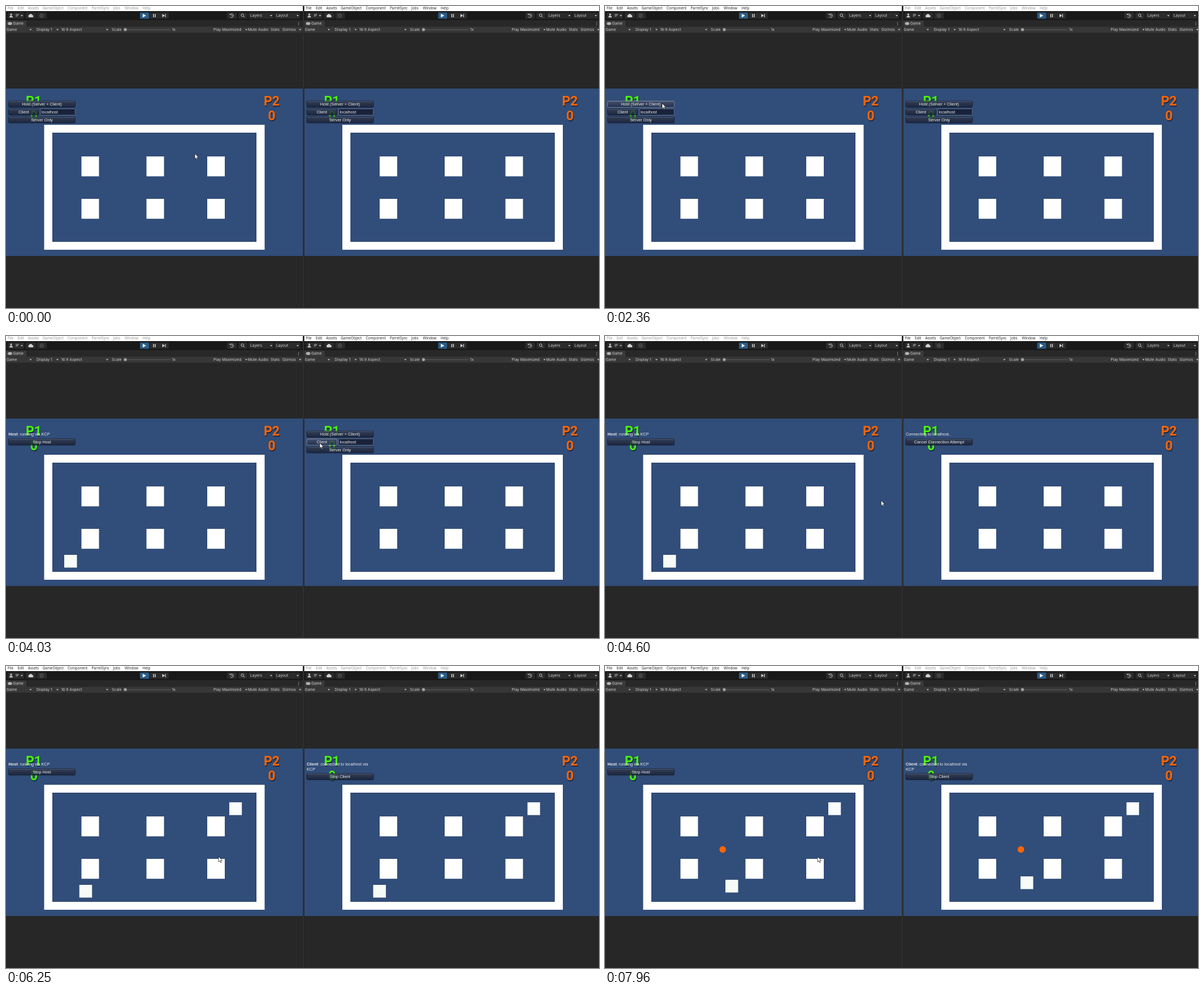
Animation, 1049 px wide and 534 px high, one loop 8000 ms. Source, as an HTML page:

```html
<!DOCTYPE html>
<html lang="en">
<head>
<meta charset="utf-8">
<title>Two game views</title>
<style>
html, body { margin: 0; width: 100%; height: 100%; overflow: hidden; background: #272727; }
svg { display: block; width: 1049px; height: 534px; }
text { white-space: pre; }
.menu { font: 6.4px "Open Sans", sans-serif; fill: #929292; }
.menu.on { fill: #1c1c1c; }
.ui { font: 6.7px Inter, sans-serif; fill: #cfcfcf; }
.gui { font: 7.3px "Liberation Sans", Arial, sans-serif; fill: #ececec; }
.mid { text-anchor: middle; }
.score { font: bold 23px Roboto, sans-serif; text-anchor: middle; }
.btn rect { fill: url(#face); stroke: #141d31; stroke-width: .8; }
.btn path { stroke: #7a8296; stroke-width: .7; opacity: .65; }
.btn.hover rect { fill: url(#lit); stroke: #8790a4; }
</style>
</head>
<body>
<svg id="stage" viewBox="0 0 1049 534" xmlns="http://www.w3.org/2000/svg"></svg>
<script>
const LOOP = 8000, SHIFT = 527.5;
const HOSTED = 2430, CONNECTING = 4160, CONNECTED = 4620, BALL = 6450;

// Motion tables: [time, x, y]
const mouse = [
  [420, 334, 261], [800, 228, 236], [1190, 121, 202], [1850, 101, 172],
  [2400, 101, 172], [2750, 235, 212], [3170, 462, 225], [3400, 522, 212],
  [3630, 555, 189], [4220, 555, 189], [4570, 500, 286], [4900, 376, 337]
];
const localPlayer = [
  [5845, 103, 387], [6650, 156, 387], [7010, 182, 362], [7080, 182, 357],
  [7500, 182, 357], [7660, 193, 357], [7960, 213, 378]
];
const remotePlayer = [
  [5960, 103, 387], [6770, 156, 387], [7140, 182, 361.5], [7220, 182, 357],
  [7580, 182, 357], [7745, 193, 357], [7960, 207.5, 372]
];
// Which window has the focus from each time on
const focus = [[0, 1], [1240, 0], [3780, 1], [5120, 0]];

const rect = (x, y, w, h, fill, more = "") =>
  `<rect x="${x}" y="${y}" width="${w}" height="${h}" fill="${fill}" ${more}/>`;
const text = (cls, x, y, s, more = "") => `<text class="${cls}" x="${x}" y="${y}" ${more}>${s}</text>`;
const arrow = (x, y) => `<path d="M${x - 2} ${y - 1}h4l-2 2.4z" fill="#c4c4c4"/>`;
const line = (d, w = 1, color = "#c4c4c4") => `<path d="${d}" fill="none" stroke="${color}" stroke-width="${w}"/>`;

function button(x, y, w, label) {
  return `<g class="btn" data-box="${x},${y},${w},11.5">` +
    `<rect x="${x}" y="${y}" width="${w}" height="11.2" rx="1.8"/>` +
    `<path d="M${x + 1.5} ${y + .9}h${w - 3}"/>` +
    text("gui mid", x + w / 2, y + 8.3, label) + `</g>`;
}

function score(x, y, s, color) {
  return text("score", x + 1, y + 1.2, s, 'fill="#1b2b48"') + text("score", x, y, s, `fill="${color}"`);
}

function menuBar(id) {
  const items = [["File", 3], ["Edit", 20.5], ["Assets", 39], ["GameObject", 64.7], ["Component", 109],
    ["ParrelSync", 151.5], ["Jobs", 189.5], ["Window", 210], ["Help", 241.5]];
  return rect(0, 0, 525, 9, "#fff") + `<g class="menu" id="menu${id}">` +
    items.map(([s, x]) => `<text x="${x}" y="5.6">${s}</text>`).join("") + `</g>`;
}

function toolbar() {
  const cells = [[3, 29], [35, 18], [55, 17], [237, 16], [254, 17], [271, 17], [391, 17], [411, 16], [429, 44], [475, 45]];
  return rect(0, 9, 525, 16, "#191919") +
    cells.map(([x, w]) => rect(x, 11.5, w, 11, x === 237 ? "#2c5d87" : "#2b2b2b", 'rx="1.2"')).join("") +
    `<circle cx="9" cy="15" r="1.7" fill="#c4c4c4"/><path d="M6 20.3c0-4.4 6-4.4 6 0z" fill="#c4c4c4"/>` +
    text("ui", 17, 19.4, "IP") + arrow(28, 17) +
    `<path d="M41 20a2.2 2.2 0 0 1 0-4.2a3 3 0 0 1 5.6.3a2 2 0 0 1 .4 3.9z" fill="#d0d0d0"/>` +
    `<circle cx="63" cy="17" r="3" fill="none" stroke="#686868"/><circle cx="63" cy="17" r="1" fill="#686868"/>` +
    `<path d="M241.8 13.8l6 3.2l-6 3.2z" fill="#fff"/>` +
    line("M261 14v6M264 14v6", 1.5, "#d4d4d4") +
    `<path d="M276.5 14l4.5 3l-4.5 3z" fill="#d4d4d4"/>` + line("M282 14v6", 1.2, "#d4d4d4") +
    line("M396.5 15a3.3 3.3 0 1 1 .1 4.2M396 13.5v2h2M399.5 15v2.2h1.8", .9) +
    `<circle cx="418.2" cy="16.2" r="2.3" fill="none" stroke="#c4c4c4"/>` + line("M420 18l2.2 2.2") +
    text("ui", 432, 19.4, "Layers") + arrow(469, 17) +
    text("ui", 478, 19.4, "Layout") + arrow(516, 17);
}

function gameBar() {
  const labels = [["Game", 1], ["Display 1", 54], ["16:9 Aspect", 97.5], ["Scale", 187], ["1x", 293.5],
    ["Play Maximized", 367], ["Mute Audio", 428], ["Stats", 468], ["Gizmos", 489]];
  return rect(0, 25, 525, 11.5, "#282828") + rect(0, 26, 36, 10.5, "#3a3a3a") +
    rect(3.2, 28.8, 7.6, 4.4, "#d0d0d0", 'rx="2.2"') +
    `<circle cx="5.3" cy="31" r=".8" fill="#333"/><circle cx="8.7" cy="31" r=".8" fill="#333"/>` +
    text("ui", 12.5, 33.4, "Game") +
    [28.5, 30.8, 33.1].map(y => rect(517, y, 1.1, 1.1, "#c4c4c4")).join("") +
    rect(0, 36.5, 525, 10.7, "#373737") +
    labels.map(([s, x]) => text("ui", x, 44.3, s)).join("") +
    [43.5, 91, 179, 425, 520.3].map(x => arrow(x, 41.8)).join("") +
    rect(211, 41.4, 80, 1, "#606060") + `<circle cx="211" cy="41.8" r="2.7" fill="#a0a0a0"/>`;
}

function arena() {
  const blocks = [133.5, 248.5, 356].map(x => [266, 341].map(y => rect(x, y, 31, 35.2, "#fff")).join("")).join("");
  return rect(0, 146, 525, 296, "#314d79") +
    rect(67.5, 210, 390, 221, "#fff") +
    rect(82, 224, 361, 192.8, "#314d79") +
    rect(82.4, 224.4, 360.2, 192, "none", 'stroke="#223a66" stroke-width=".8"') + blocks;
}

function panel(id) {
  const startMenu = button(4.5, 168, 118, "Host (Server + Client)") +
    button(4.5, 181.8, 53.5, "Client") +
    rect(61, 181.8, 61.3, 11.2, "#18223b", 'rx="1.5" stroke="#717c93" stroke-width=".8"') +
    text("gui", 63, 190, "localhost") +
    button(4.5, 195.6, 118, "Server Only");
  const bold = s => `<tspan font-weight="bold">${s}</tspan>`;
  const running = id
    ? text("gui", 4.5, 176, bold("Client") + ": connected to localhost via") + text("gui", 4.5, 184.5, "KCP") +
      button(4.5, 190, 118, "Stop Client")
    : text("gui", 4.5, 176, bold("Host") + ": running via KCP") + button(4.5, 181.8, 118, "Stop Host");
  const waiting = text("gui", 4.5, 176, "Connecting to localhost..") + button(4.5, 181.8, 118, "Cancel Connection Attempt");
  return `<g transform="translate(${id * SHIFT})">` +
    rect(0, 0, 525, 534, "#272727") + menuBar(id) + toolbar() + gameBar() + arena() +
    `<circle id="ball${id}" cx="208.2" cy="324.4" r="5.8" fill="#ff6505"/>` +
    rect(0, 0, 22.5, 22.5, "#f6fbf8", `id="one${id}"`) +
    rect(395, 241, 22.2, 22.6, "#fafdfd", `id="two${id}"`) +
    score(49, 176.3, "P1", "#48f60a") + score(49.3, 202.3, "0", "#48f60a") +
    score(470, 176.3, "P2", "#ff6505") + score(470, 202.3, "0", "#ff6505") +
    `<g id="start${id}">${startMenu}</g><g id="wait${id}">${waiting}</g><g id="run${id}">${running}</g></g>`;
}

const gradient = (id, top, bottom) =>
  `<linearGradient id="${id}" x2="0" y2="1"><stop stop-color="${top}" stop-opacity=".84"/>` +
  `<stop offset="1" stop-color="${bottom}" stop-opacity=".84"/></linearGradient>`;

const stage = document.getElementById("stage");
stage.innerHTML = `<defs>${gradient("face", "#343c50", "#171f33")}${gradient("lit", "#47506a", "#202a43")}</defs>` +
  panel(0) + panel(1) + rect(525, 0, 2.5, 534, "#202020") + rect(525.6, 9, .9, 525, "#454545") +
  `<path id="mouse" d="M0 0V9.4L2.1 7.5L3.6 10.8L5.1 10.1L3.7 6.9H6.6Z" fill="#fff" stroke="#151515" stroke-width=".7"/>`;

const el = id => document.getElementById(id);
const show = (id, on) => el(id).setAttribute("visibility", on ? "visible" : "hidden");
const move = (id, [x, y]) => el(id).setAttribute("transform", `translate(${x} ${y})`);

function along(table, t) {
  const i = table.findIndex(p => p[0] > t);
  if (i === 0) return table[0].slice(1);
  if (i < 0) return table[table.length - 1].slice(1);
  const [t0, x0, y0] = table[i - 1], [t1, x1, y1] = table[i];
  const k = (t - t0) / (t1 - t0);
  return [x0 + (x1 - x0) * k, y0 + (y1 - y0) * k];
}

const buttons = [...document.querySelectorAll(".btn")].map(node => ({
  node,
  box: node.dataset.box.split(",").map(Number),
  shift: node.closest("#start1, #wait1, #run1") ? SHIFT : 0
}));

function draw(t) {
  const active = focus.filter(f => f[0] <= t).pop()[1];
  const pos = along(mouse, t);
  const starts = [HOSTED, CONNECTING], runs = [HOSTED, CONNECTED];
  for (const id of [0, 1]) {
    el("menu" + id).classList.toggle("on", id === active);
    show("start" + id, t < starts[id]);
    show("wait" + id, t >= starts[id] && t < runs[id]);
    show("run" + id, t >= runs[id]);
    show("one" + id, t >= runs[id]);
    show("two" + id, t >= CONNECTED);
    show("ball" + id, t >= BALL);
  }
  move("one0", along(localPlayer, t));
  move("one1", along(remotePlayer, t));
  move("mouse", pos);
  for (const { node, box: [x, y, w, h], shift } of buttons) {
    const dx = pos[0] - shift - x, dy = pos[1] - y;
    node.classList.toggle("hover", t >= 1240 && dx >= 0 && dx <= w && dy >= 0 && dy <= h);
  }
}

const begin = performance.now();
function tick() {
  draw((performance.now() - begin) % LOOP);
  requestAnimationFrame(tick);
}
tick();
</script>
</body>
</html>
```
